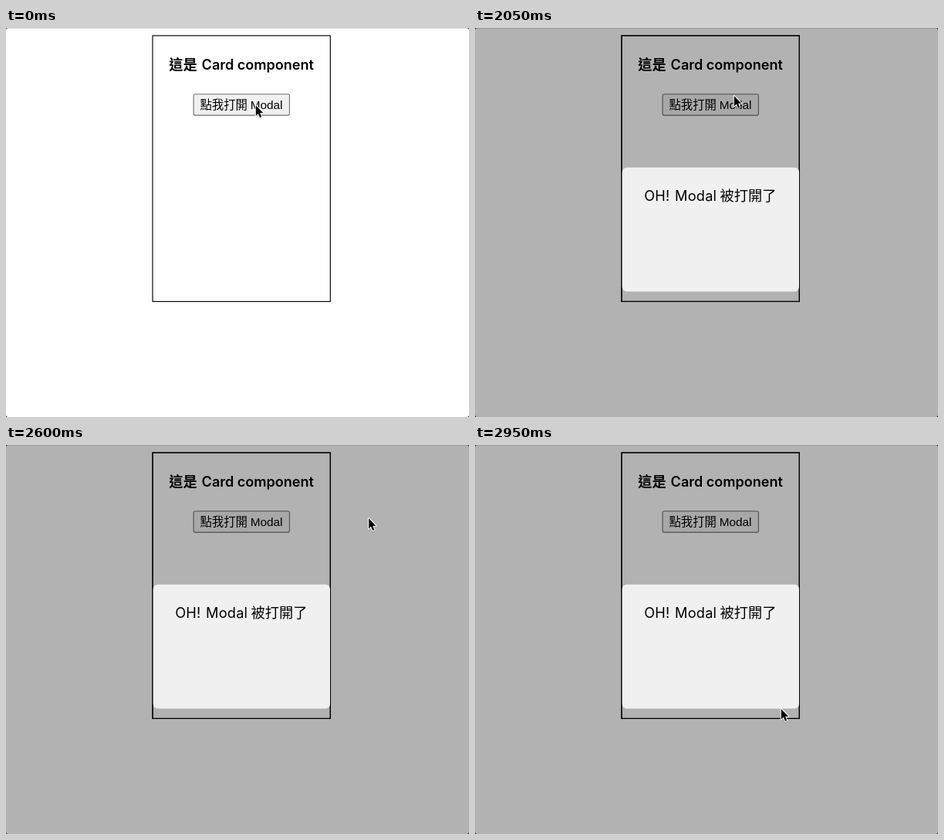
Recreate the animation shown at these times as an HTML page. Size 600 by 504 pixels, loop 3000 ms.

```html
<!DOCTYPE html>
<html lang="zh-TW">
<head>
<meta charset="utf-8">
<title>Card and modal</title>
<style>
  html, body { margin: 0; width: 100%; height: 100%; overflow: hidden; background: #fefefe; }
  svg { display: block; width: 600px; height: 504px; }
  text { fill: #000; white-space: pre; }
  .cjk { font-family: "Noto Sans CJK TC", "Noto Sans CJK JP", "Noto Sans CJK", sans-serif; font-weight: 500; }
  .latin { font-family: Inter, sans-serif; }
  .arial { font-family: "Liberation Sans", Arial, sans-serif; }
  .title { font-weight: 600; }
  .title.cjk { font-weight: 700; }
  .loose { letter-spacing: .2px; word-spacing: 1.3px; }
</style>
</head>
<body>
<svg viewBox="0 0 600 504">
  <defs>
    <filter id="soft" x="-50%" y="-50%" width="200%" height="200%">
      <feGaussianBlur stdDeviation="1"/>
    </filter>
    <path id="arrow" d="M0 0V13.4L3 10.6L5.2 15.8L7.4 14.9L5.3 9.8H9.4Z"/>
    <rect id="card" x="190" y="9.9" width="230.3" height="344.5" fill="none" stroke="#000" stroke-width="1.15"/>
  </defs>

  <rect width="600" height="504" fill="#fefefe"/>
  <rect width="600" height="1" fill="#dcdcdc"/>
  <path d="M0 0H3Q0 0 0 3ZM600 0H597Q600 0 600 3ZM0 504H3Q0 504 0 501ZM600 504H597Q600 504 600 501Z" fill="#333"/>

  <use href="#card"/>
  <text class="cjk title" x="211.2" y="54" font-size="18.2">這是</text>
  <text class="latin title" x="253.6" y="54" font-size="18.05">Card component</text>

  <rect id="button" x="243.1" y="85.8" width="124.3" height="27.3" rx="2" stroke="#707070" stroke-width="1.1"/>
  <text class="cjk" x="251.4" y="105.3" font-size="15.4">點我打開</text>
  <text class="arial" x="316.8" y="105" font-size="15.3">Modal</text>

  <g id="modal">
    <rect width="600" height="504" fill="#000" fill-opacity=".3"/>
    <use href="#card"/>
    <rect x="190.7" y="180.8" width="229.3" height="160.8" rx="6" fill="#f0f0f0"/>
    <text class="latin loose" x="219.2" y="224" font-size="18.2">OH! Modal</text>
    <text class="cjk" x="317.6" y="224" font-size="18.2">被打開了</text>
  </g>

  <g id="cursor">
    <use href="#arrow" y="1.5" fill="#000" opacity=".3" filter="url(#soft)"/>
    <use href="#arrow" fill="#000" stroke="#fff" stroke-width="2" stroke-linejoin="round" style="paint-order: stroke"/>
  </g>
</svg>
<script>
const LOOP = 3000, STEP = 50, PRESS = 1450, OPEN = 1550, MOVE = 2050;
const byId = id => document.getElementById(id);
const button = byId("button"), modal = byId("modal"), cursor = byId("cursor");

// time, x, y of the pointer tip
const path = [
  [2050, 335.8, 88], [2150, 354, 76], [2250, 398, 60], [2350, 444, 54],
  [2450, 464.8, 69], [2550, 467, 78], [2600, 470, 95], [2750, 477.8, 188],
  [2850, 455, 267], [2950, 396.8, 342]
];

function slope(i, axis) {
  const a = path[Math.max(i - 1, 0)], b = path[Math.min(i + 1, path.length - 1)];
  return (b[axis] - a[axis]) / (b[0] - a[0]);
}

// cubic Hermite through the path points
function along(t, axis) {
  const last = path.length - 1;
  if (t >= path[last][0]) return path[last][axis];
  let i = 0;
  while (t >= path[i + 1][0]) i++;
  const a = path[i], b = path[i + 1], span = b[0] - a[0], u = (t - a[0]) / span;
  const ease = u * u * (3 - 2 * u);
  return a[axis] + (b[axis] - a[axis]) * ease
    + span * u * (1 - u) * ((1 - u) * slope(i, axis) - u * slope(i + 1, axis));
}

function draw(time) {
  const t = Math.floor((time % LOOP) / STEP) * STEP;
  const x = t < MOVE ? 323.8 : along(t, 1);
  const y = t < MOVE ? 100.3 : along(t, 2);
  button.setAttribute("fill", t >= PRESS && t < OPEN ? "#e5e5e5" : "#f0f0f0");
  modal.setAttribute("visibility", t >= OPEN ? "visible" : "hidden");
  cursor.setAttribute("transform", `translate(${x.toFixed(2)} ${y.toFixed(2)})`);
}

const start = performance.now();
function tick() {
  draw(performance.now() - start);
  requestAnimationFrame(tick);
}
tick();
</script>
</body>
</html>
```
